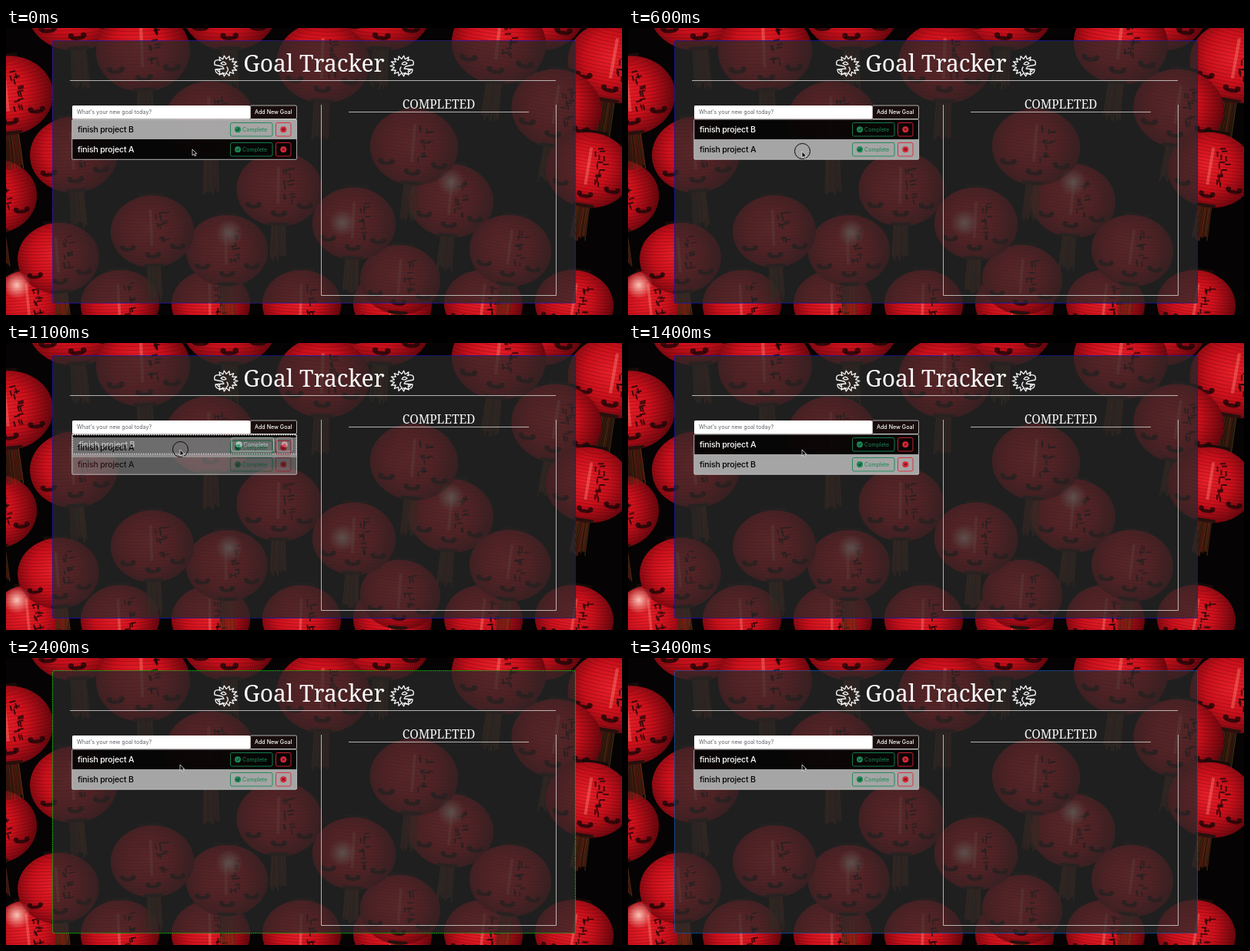
These frames come from a looping animation (800 px wide and 374 px high, 3.5 s). An HTML page with a canvas:

```html
<!DOCTYPE html>
<html lang="en">
<head>
<meta charset="utf-8">
<title>Goal Tracker</title>
<style>
html, body { margin: 0; width: 100%; height: 100%; overflow: hidden; background: #050303; }
canvas, svg { position: absolute; left: 0; top: 0; width: 800px; height: 374px; }
text { font-family: Inter, "Liberation Sans", sans-serif; font-size: 7.1px; }
.serif { font-family: "Noto Serif", "Liberation Serif", serif; fill: #fafafa; text-anchor: middle; }
.goal { font-size: 10.6px; font-weight: 500; letter-spacing: -.2px; }
.line { fill: none; stroke: #d8d8d8; stroke-width: .8; }
.box { fill: none; stroke-width: .9; }
.green { stroke: #198754; }
.red { stroke: #e02435; }
</style>
</head>
<body>
<canvas id="photo" width="800" height="374"></canvas>
<svg viewBox="0 0 800 374">
  <defs>
    <g id="dragon" fill="none" stroke="#f4f4f4" stroke-width="1.3" stroke-linejoin="round" stroke-linecap="round">
      <path id="mane"/>
      <path d="M9 6Q-1 4 1 12L11 14L13 17L2 18Q2 26 14 23M4 18L6 21L8 18"/>
      <path d="M9 10Q13 6 16 11Q12 13 9 10M17 15Q20 19 16 22"/>
    </g>
  </defs>
  <rect x="60.5" y="16.5" width="679" height="342" rx="2" fill="#282828" fill-opacity=".75"/>
  <rect id="edge" x="60.5" y="16.5" width="679" height="342" rx="2" fill="none" stroke-width="1.2" stroke-dasharray="2 .7"/>
  <text class="serif" x="400" y="57" style="font-size:30px">Goal Tracker</text>
  <use href="#dragon" x="270" y="36"/>
  <use href="#dragon" transform="translate(530 36) scale(-1 1)"/>
  <path class="line" d="M83 68.5H714M445 109.5H679M409.5 100V348.5H714.5V100"/>
  <text class="serif" x="562" y="105" style="font-size:15.5px">COMPLETED</text>
  <rect x="86" y="101" width="231" height="17.5" rx="1.5" fill="#fff"/>
  <text x="92" y="112.3" fill="#5c6066">What's your new goal today?</text>
  <rect x="317.5" y="101" width="60" height="17.5" rx="1.5" fill="#190d0d" stroke="#eee" stroke-width=".7"/>
  <text x="323" y="112.3" fill="#fff" font-weight="500">Add New Goal</text>
  <g id="list"></g>
  <rect class="line" x="85.8" y="119" width="291.8" height="52.3" rx="1.5"/>
  <g id="pointer">
    <circle id="ring" cx=".5" cy="-.5" r="10" fill="none" stroke="#080808"/>
    <path d="M0 0V8L2 6.3L3.2 9L4.6 8.4L3.4 5.8H5.8Z" fill="#080808" stroke="#fff" stroke-width=".7"/>
  </g>
</svg>
<script>
const LOOP = 3500, STEP = 100, ROW = 26, TOP = 119;
const GRAB = 700, DROP = 1200;
const $ = id => document.getElementById(id);
const lerp = (a, b, k) => a + (b - a) * k;
const ramp = (t, from, to) => Math.max(0, Math.min(1, (t - from) / (to - from)));
const easeOut = k => 1 - (1 - k) ** 2;
const show = (el, on) => el.style.display = on ? '' : 'none';

// Centres of the main lanterns, back to front.
const centres = [
  [-15, 220], [790, 45], [640, 20], [265, 120], [2, 88], [715, 105], [178, 30],
  [412, 45], [512, 328], [757, 185], [578, 225], [355, 210], [88, 165],
  [655, 290], [452, 255], [287, 290], [530, 155], [190, 265], [68, 300]
];

function paintPhoto() {
  const c = $('photo').getContext('2d');
  let seed = 7;
  const rnd = () => (seed = seed * 16807 % 2147483647) / 2147483647;

  const blob = (x, y, rx, ry, fill) => {
    c.fillStyle = fill;
    c.beginPath();
    c.ellipse(x, y, rx, ry, 0, 0, 7);
    c.fill();
  };
  const radial = (x, y, r, ...colours) => {
    const g = c.createRadialGradient(x, y, 0, x, y, r);
    colours.forEach((col, i) => g.addColorStop(i / (colours.length - 1), col));
    return g;
  };
  const stroke = (x1, y1, x2, y2) => {
    c.beginPath();
    c.moveTo(x1, y1);
    c.lineTo(x2, y2);
    c.stroke();
  };

  function tassel(r, h) {
    c.lineWidth = 1.2;
    for (let i = -5; i <= 5; i++) {
      c.strokeStyle = `rgb(${60 + rnd() * 55},${28 + rnd() * 25},20)`;
      stroke(i * r * .03, h, i * r * .035, h + r * (.7 + rnd() * .15));
    }
  }

  function ribs(r, h) {
    c.lineWidth = .6;
    c.strokeStyle = 'rgba(70,0,8,.45)';
    for (let v = -.96; v < 1; v += .09) {
      c.beginPath();
      c.ellipse(0, v * h, r * Math.sqrt(1 - v * v), r * .1, 0, 0, Math.PI);
      c.stroke();
    }
  }

  // Loose brush marks down the front and scrolls around the base.
  function ornaments(r, h) {
    const ink = 'rgba(30,5,7,.8)';
    c.strokeStyle = ink;
    c.lineWidth = r * .035;
    for (let i = 0; i < 15; i++) {
      const x = r * (.08 + rnd() * .22), y = h * (-.6 + Math.floor(i / 5) * .35 + rnd() * .22);
      const flat = i % 2;
      stroke(x, y, x + r * (flat ? .13 : .02), y + r * (flat ? -.02 : .12));
    }
    for (let s = -1; s <= 1; s++) {
      const x = s * r * .6, y = h * (.7 - s * s * .22);
      blob(x, y, r * .15, h * .05, ink);
      for (const side of [-1, 1]) blob(x + side * r * .13, y - h * .06, r * .06, h * .065, ink);
    }
  }

  function lantern([x, y]) {
    const r = 62 - y * .03, h = r * .87;
    c.save();
    c.translate(x, y);
    c.rotate((x - 300) / 2800);
    tassel(r, h * .96);
    c.fillStyle = '#180b09';
    c.fillRect(-r * .3, -h * 1.06, r * .6, h * .16);
    c.beginPath();
    c.ellipse(0, 0, r, h, 0, 0, 7);
    c.clip();
    c.fillStyle = radial(-r * .1, -h * .1, r * 1.1, '#e8202a', '#cb101b', '#66060d');
    c.fillRect(-r, -h, 2 * r, 2 * h);
    ribs(r, h);
    c.fillStyle = 'rgba(255,150,130,.35)';
    c.fillRect(-r * .06, -h * .6, r * .07, h);
    ornaments(r, h);
    c.fillStyle = '#28100d';
    c.fillRect(-r * .24, h * .9, r * .48, h * .12);
    c.restore();
  }

  c.fillStyle = '#050303';
  c.fillRect(0, 0, 800, 374);
  for (let x = 90; x < 800; x += 200) lantern([x, -25]);
  for (let x = 30; x < 800; x += 118) lantern([x, 360]);
  centres.forEach(lantern);
  for (const [x, y] of [[14, 335], [290, 267], [437, 254], [578, 201]])
    blob(x, y, 18, 18, radial(x, y, 18, 'rgba(255,215,200,.9)', 'rgba(255,190,170,0)'));
}

// Spiky ring, open towards the snout.
function maneOutline() {
  let d = '';
  for (let i = 0; i <= 22; i++) {
    const a = lerp(-2.3, 2.3, i / 22), k = i % 2 ? 1 : .68;
    d += `${i ? 'L' : 'M'}${15 + 16 * k * Math.cos(a)} ${13.5 + 13.5 * k * Math.sin(a)}`;
  }
  return d;
}

const rowMarkup = name => `
  <rect class="bg" x="86" width="291.5" height="${ROW}"/>
  <rect class="dots" x="86.5" y=".5" width="290.5" height="25" fill="none" stroke="#fff" stroke-width="1.3" stroke-dasharray="1.5 1.5"/>
  <g class="body">
    <text class="goal" x="93" y="16.7">finish project ${name}</text>
    <g class="buttons">
      <rect class="box green" x="291.5" y="4.5" width="54.5" height="17.5" rx="2"/>
      <circle cx="301" cy="13.2" r="4" fill="#198754"/>
      <path d="M299 13.3l1.5 1.5l2.5-3" fill="none" stroke="#102018"/>
      <text x="307" y="15.7" fill="#198754">Complete</text>
      <rect class="box red" x="350.5" y="4.5" width="19.5" height="17.5" rx="2"/>
      <circle cx="360.3" cy="13.2" r="4" fill="#e02435"/>
      <path d="M359 11.8l2.8 2.8m0-2.8l-2.8 2.8" stroke="#301014"/>
    </g>
  </g>`;

function addRow(name) {
  const g = document.createElementNS('http://www.w3.org/2000/svg', 'g');
  g.innerHTML = rowMarkup(name);
  $('list').append(g);
  const part = s => g.querySelector(s);
  // hover runs from 0 (black row) to 1 (grey row)
  return ({ y, hover, opacity = 1, dotted = false, shown = true }) => {
    const shade = lerp(3, 170, hover), ink = lerp(255, 0, hover);
    g.setAttribute('transform', `translate(0 ${y})`);
    g.setAttribute('opacity', opacity);
    show(g, shown);
    show(part('.dots'), dotted);
    part('.bg').setAttribute('fill', `rgba(${shade},${shade},${shade},${lerp(.88, .97, hover)})`);
    part('.goal').setAttribute('fill', `rgb(${ink},${ink},${ink})`);
    part('.body').setAttribute('transform', `translate(${dotted ? 1.5 : 0} 0)`);
    part('.buttons').style.filter = dotted ? 'grayscale(.6) brightness(2.2)' : '';
  };
}

function edgeHue(t) {
  if (t < 1700) return lerp(252, 240, ramp(t, 0, 600));
  return t < 2300 ? lerp(240, 70, ramp(t, 1700, 2000)) : lerp(70, 215, ramp(t, 2300, 2600));
}

paintPhoto();
$('mane').setAttribute('d', maneOutline());
const setB = addRow('B'), setA = addRow('A'), setGhost = addRow('A');

function draw(t) {
  const drag = t >= GRAB && t < DROP, dropped = t >= DROP;
  const fade = ramp(t, 0, 300);
  const lift = 22 * easeOut(ramp(t, GRAB, 1100));
  const x = 242 - 16 * easeOut(ramp(t, 0, 600));
  const y = 158 + 3 * fade - lift;
  const low = TOP + ROW;

  setB({ y: dropped ? low : TOP, hover: dropped ? 1 : 1 - fade, dotted: drag });
  setA({ y: dropped ? TOP : low, hover: dropped ? 0 : fade, opacity: drag ? .45 : 1 });
  setGhost({ y: low - lift, hover: 1, opacity: .65, shown: drag });
  $('pointer').setAttribute('transform', `translate(${x} ${y})`);
  show($('ring'), t >= 500 && !dropped);
  $('edge').setAttribute('stroke', `hsl(${edgeHue(t)} 75% 36%)`);
}

const start = performance.now();
function tick() {
  const t = (performance.now() - start) % LOOP;
  draw(Math.floor(t / STEP) * STEP);
  requestAnimationFrame(tick);
}
tick();
</script>
</body>
</html>
```
